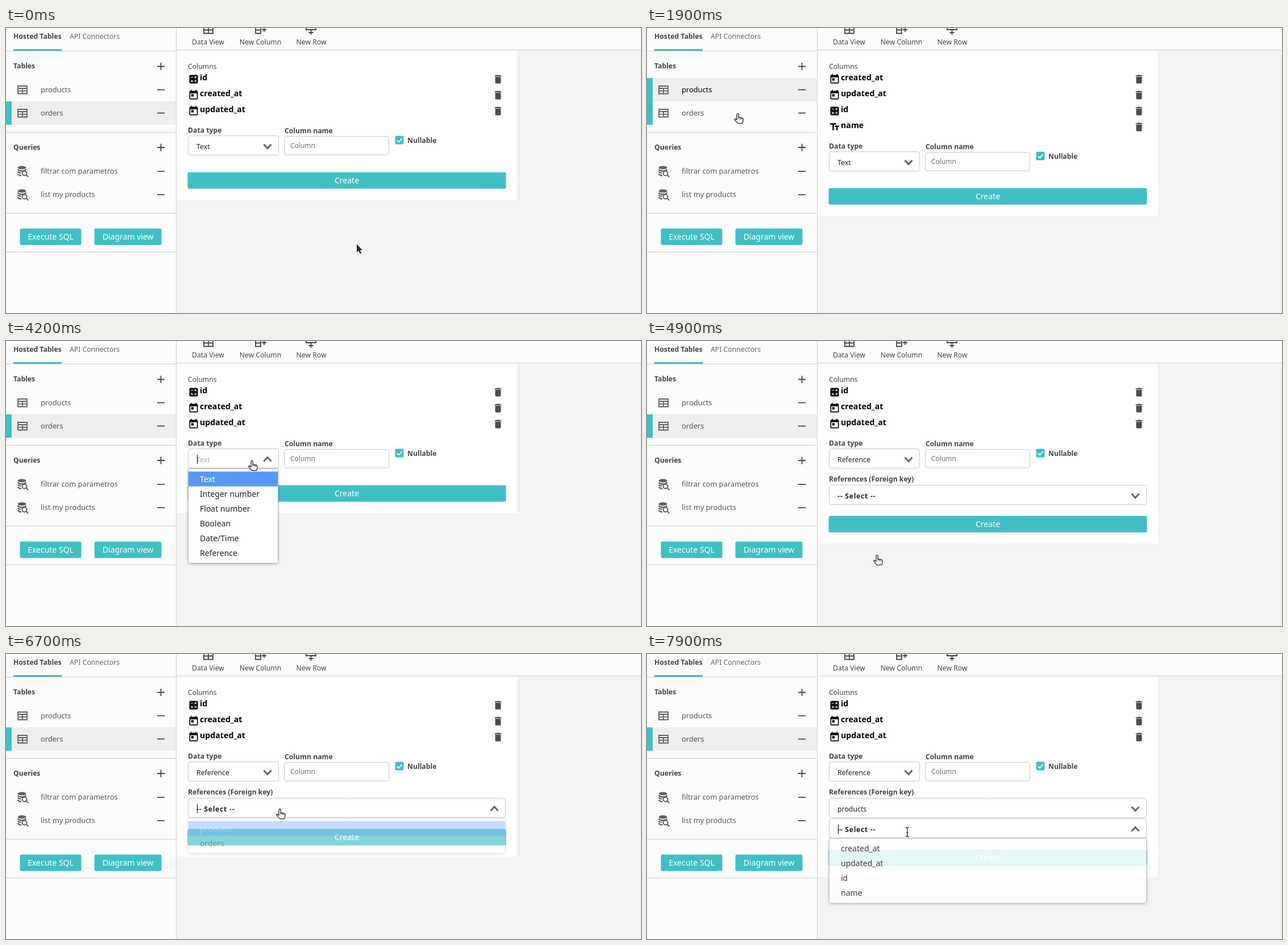
An HTML page with a canvas that plays this animation: 1117 by 501 pixels, repeating every 8 s.

```html
<!DOCTYPE html>
<html lang="en">
<head>
<meta charset="utf-8">
<title>Table editor</title>
<style>
html, body { margin: 0; width: 100%; height: 100%; overflow: hidden; background: #f3f3f3; }
canvas { display: block; }
</style>
</head>
<body>
<canvas id="stage" width="1117" height="501"></canvas>
<script>
const ctx = document.getElementById('stage').getContext('2d');
const TEAL = '#40bfc5', LINE = '#cfcfcf', GREY = '#616161', DARK = '#444';
const LOOP = 8000, STEP = 100;

// Cursor stops: time, hot spot x and y, shape from then on
const stops = [
  [0, 617, 380, 'arrow'], [200, 617, 380, 'arrow'], [400, 444, 256, 'hand'], [500, 444, 256, 'arrow'],
  [800, 169, 113, 'hand'], [900, 169, 113, 'hand'], [1000, 179, 120, 'hand'], [1100, 179, 120, 'hand'],
  [1400, 172, 118, 'hand'], [1500, 172, 118, 'hand'], [1900, 160, 150, 'hand'], [2600, 160, 150, 'hand'],
  [2700, 179, 154, 'hand'], [2800, 235, 164, 'hand'], [2900, 300, 177, 'arrow'], [3200, 402, 200, 'arrow'],
  [3300, 402, 200, 'arrow'], [3400, 425, 203, 'arrow'], [3700, 425, 203, 'hand'], [3900, 433, 210, 'hand'],
  [4200, 433, 210, 'hand'], [4600, 405, 376, 'hand'], [5100, 405, 376, 'arrow'], [5600, 515, 215, 'beam'],
  [5800, 522, 208, 'beam'], [6300, 522, 208, 'beam'], [6400, 518, 220, 'arrow'], [6700, 482, 272, 'hand'],
  [7100, 476, 292, 'hand'], [7200, 473, 303, 'hand'], [7300, 473, 303, 'hand'], [7600, 458, 313, 'hand'],
  [7800, 458, 313, 'beam'], [LOOP, 458, 313, 'beam']
];
const pointers = {
  arrow: new Path2D('M0 0V14.5l3.3-3 2.5 5.5 2.4-1-2.5-5.4H10z'),
  hand: new Path2D('M-2 11V2a1.6 1.6 0 0 1 3.2 0V7l6 1.2q2 .5 2 2.5l-.5 4-1.2 3H-.6l-5.2-6.3q-.8-1.8 1-1.9 1 .2 2.8 2z'),
  beam: new Path2D('M-3-8q3 0 3 2V6q0 2-3 2M3-8Q0-8 0-6M0 6q0 2 3 2M-1.5 1h3')
};

function rect(x, y, w, h, fill, radius = 0, border) {
  ctx.beginPath();
  ctx.roundRect(x, y, w, h, radius);
  if (fill) { ctx.fillStyle = fill; ctx.fill(); }
  if (border) { ctx.strokeStyle = border; ctx.lineWidth = 1; ctx.stroke(); }
}
function text(str, x, y, size, weight = 400, color = DARK, align = 'left') {
  ctx.font = `${weight} ${size}px "Noto Sans", sans-serif`;
  ctx.textAlign = align;
  ctx.fillStyle = color;
  ctx.fillText(str, x, y);
}
function stroke(path, x, y, color = GREY, width = 2) {
  ctx.save();
  ctx.translate(x, y);
  ctx.strokeStyle = color;
  ctx.lineWidth = width;
  ctx.stroke(new Path2D(path));
  ctx.restore();
}
// Icon drawn on a 24 unit grid, shown 20 pixels wide
function icon(path, x, y, color) {
  ctx.save();
  ctx.translate(x, y);
  ctx.scale(20 / 24, 20 / 24);
  ctx.fillStyle = color;
  ctx.fill(new Path2D(path), 'evenodd');
  ctx.restore();
}
function button(label, x, y, w, color = TEAL) {
  rect(x - .5, y - .5, w + 1, 29, color, 3);
  text(label, x + w / 2, y + 19, 14, 500, '#fff', 'center');
}

const tableIcon = (x, y) => stroke('M1 1H17V14.5H1zM1 5H17M1 9.7H17M9 5V14.5', x, y, GREY, 1.8);
const plus = y => stroke('M0 6.5H13M6.5 0V13', 266, y - 6.5, DARK, 1.8);
const minus = y => stroke('M0 0H13', 266, y, DARK, 1.8);
const trash = y => icon('M6 19q0 2 2 2h8q2 0 2-2V7H6zM19 4h-3.5l-1-1h-5l-1 1H5v2h14z', 855.5, y, '#4c4c4c');

function queryIcon(y) {
  ctx.fillStyle = GREY;
  ctx.beginPath(); ctx.ellipse(28, y - 6, 7.5, 3, 0, 0, 7); ctx.fill();
  stroke('M-7.5 -3Q-5 0 0 0T7.5-3M-7.5 1Q-5 3.5-2 3.5M-7.5 5Q-5 8-1 8', 28, y, GREY, 2.4);
  ctx.beginPath(); ctx.arc(32.5, y + 4, 4, 0, 7);
  ctx.fillStyle = '#fcfcfc'; ctx.fill();
  ctx.strokeStyle = GREY; ctx.lineWidth = 2; ctx.stroke();
  stroke('M0 0L4 4', 35.2, y + 6.5);
}
function columnIcon(name, y) {
  if (name === 'id') {
    rect(322.5, y + 2.5, 15, 15, '#000', 2);
    stroke('M-5-3.5H-1M1.5 2.2H5.2M1.5 4.4H5.2M-5 3.3H-1M-3 1.3V5.3M1.6-5.2L5-1.8M5-5.2L1.6-1.8', 330, y + 10, '#fff', 1.2);
  } else if (name === 'name') {
    icon('M2.5 4v3h5v12h3V7h5V4zM21.5 9h-9v3h3v7h3v-7h3z', 320, y, '#000');
  } else {
    icon('M19 3h-1V1h-2v2H8V1H6v2H5q-2 0-2 2V19q0 2 2 2h14q2 0 2-2V5q0-2-2-2zM5 8h14v11H5zM7 10h5v5H7z', 320, y, '#000');
  }
}

function select(x, y, w, value, { open = false, dim = false, prompt = false } = {}) {
  rect(x + .5, y + .5, w - 1, 34, '#fff', 4, '#c8c8c8');
  ctx.letterSpacing = prompt ? '.7px' : '0px';
  text(value, x + 15, y + 24, 12.3, prompt ? 600 : 500, dim && open ? '#aaa' : '#222');
  ctx.letterSpacing = '0px';
  if (open) rect(x + 16, y + 11, 1, 16, '#000');
  stroke(open ? 'M-6.5 3.5L0-3.5L6.5 3.5' : 'M-6.5-3.5L0 3.5L6.5-3.5', x + w - 20, y + 19, '#666', 3);
}
function dropdown(x, y, w, options, alpha, active) {
  if (!alpha) return;
  const h = options.length * 26 + 10, corners = [0, 0, 4, 4];
  ctx.save();
  ctx.globalAlpha = alpha;
  // Keep the shadow outside the box, so that it does not show through
  ctx.save();
  ctx.beginPath();
  ctx.rect(0, 0, 1117, 501);
  ctx.rect(x, y, w + 1, h + .5);
  ctx.clip('evenodd');
  ctx.shadowColor = '#0005';
  ctx.shadowBlur = 5;
  ctx.shadowOffsetY = 1;
  rect(x + .5, y, w, h, '#fff', corners);
  ctx.restore();
  rect(x + .5, y, w, h, '#fff', corners, '#bbb');
  options.forEach((name, i) => {
    const top = y + 5 + i * 26;
    if (i === active) rect(x + 1, top, w - 1, 26, '#5897f5');
    text(name, x + 21, top + 18, 14, 500, i === active ? '#fff' : '#222');
  });
  ctx.restore();
}
function fade(t, open, close) {
  if (t < open || t >= close + STEP) return 0;
  if (t >= close) return .4;
  return t < open + STEP ? .35 : t < open + 2 * STEP ? .87 : 1;
}

function pointerAt(t) {
  const i = stops.findIndex(s => s[0] > t) - 1;
  const [t0, x0, y0, shape] = stops[i], [t1, x1, y1] = stops[i + 1];
  const k = (t - t0) / (t1 - t0);
  return { x: x0 + (x1 - x0) * k, y: y0 + (y1 - y0) * k, shape };
}
function drawPointer({ x, y, shape }) {
  const path = pointers[shape];
  ctx.save();
  ctx.translate(x, y);
  ctx.lineJoin = 'round';
  ctx.strokeStyle = '#fff';
  ctx.lineWidth = shape === 'hand' ? 3 : 2.5;
  ctx.stroke(path);
  if (shape !== 'beam') { ctx.fillStyle = shape === 'hand' ? '#fff' : '#222'; ctx.fill(path); }
  if (shape !== 'arrow') { ctx.strokeStyle = '#222'; ctx.lineWidth = 1.3; ctx.stroke(path); }
  if (shape === 'hand') stroke('M1.2 7V10M3.9 8V11M6.5 8.5V11', 0, 0, '#222', 1);
  ctx.restore();
}

function sidebar(t, pointer) {
  rect(0, 0, 299, 501, '#fcfcfc');
  text('Hosted Tables', 13, 19, 12.2, 600);
  text('API Connectors', 112, 19, 12.2, 500, '#666');
  for (const y of [40, 183, 325, 393]) rect(0, y, 299, 1, LINE);
  rect(13, 37, 85, 3, TEAL);
  text('Tables', 13, 71, 12.2, 600);
  text('Queries', 13, 214, 12.2, 600);
  plus(67.5);
  plus(210);

  const selected = t >= 1200 && t < 2200 ? 0 : 1;
  const focused = t >= 1200 && t < 3800;
  ['products', 'orders'].forEach((name, i) => {
    const top = 88 + i * 41;
    const hover = pointer.x < 299 && pointer.y >= top && pointer.y < top + 41;
    if (i === selected) rect(0, top, 299, 41, '#eee');
    if (i === selected || hover) rect(0, top, 10, 41, TEAL);
    tableIcon(20, top + 13);
    text(name, 61, top + 25, 12.8, 500, i === selected && focused ? '#000' : '#555');
    minus(top + 20.5);
  });
  ['filtrar com parametros', 'list my products'].forEach((name, i) => {
    const y = 251.5 + i * 41;
    queryIcon(y);
    text(name, 61, y + 4.5, 12.8, 500, '#555');
    minus(y + .5);
  });
  button('Execute SQL', 25, 353, 107);
  button('Diagram view', 156, 353, 117);
  rect(299, 0, 1, 501, LINE);
}

function toolbar() {
  rect(300, 0, 817, 38, '#fcfcfc');
  rect(300, 38, 817, 1, LINE);
  stroke('M1-4V9.5H17V-4M1 3.5H17M9-4V9.5', 347, 0, DARK, 1.8);
  stroke('M1-4V9.5H10V-4M1 3.5H10M12 3H20M16-1V7', 438, 0, DARK, 1.8);
  stroke('M1-4V3H18V-4M9.5 4V12M5.5 8H13.5', 527, 0, DARK, 1.8);
  text('Data View', 355.5, 29, 12.2, 500, DARK, 'center');
  text('New Column', 447.5, 29, 12.2, 500, DARK, 'center');
  text('New Row', 537, 29, 12.2, 500, DARK, 'center');
}

const productColumns = ['created_at', 'updated_at', 'id', 'name'];
const orderColumns = ['id', 'created_at', 'updated_at'];
const dataTypes = ['Text', 'Integer number', 'Float number', 'Boolean', 'Date/Time', 'Reference'];

function panel(t, pointer) {
  const columns = t >= 1300 && t < 2300 ? productColumns : orderColumns;
  const shift = (columns.length - 3) * 28;
  const reference = t >= 4700, second = t >= 7500;
  const createY = second ? 344 : reference ? 308 : 254 + shift;

  rect(300, 39, 599, createY + 9, '#fff');
  text('Columns', 320, 72, 12.2, 500);
  columns.forEach((name, i) => {
    const y = 80 + i * 28;
    columnIcon(name, y);
    text(name, 341, y + 12, 14.2, 600, '#000');
    trash(y);
  });

  text('Data type', 320, 184 + shift, 12.2, 600);
  select(320, 189 + shift, 160, reference ? 'Reference' : 'Text', { open: t >= 3800 && t < 4700, dim: true });

  const typing = t >= 5700 && t < 6700;
  text('Column name', 490, 185 + shift, 12.2, 600);
  rect(489.5, 190.5 + shift, 184, 32.5, '#fff', 4, typing ? '#777' : '#c8c8c8');
  text('Column', 500, 211 + shift, 12, 500, '#707070');
  if (typing) {
    let wave = 'M0 1';
    for (let x = 2; x <= 44; x += 2) wave += `L${x} ${x % 4 ? -.5 : 1}`;
    stroke(wave, 500, 213, '#e33', 1);
  }

  rect(684.5, 189.5 + shift, 15, 15, TEAL, 2);
  stroke('M3 7.5L6 10.5L11.5 4', 685, 190 + shift, '#fff', 1.8);
  text('Nullable', 706, 202 + shift, 12.2, 600);

  if (reference) {
    const chosen = t >= 7400;
    text('References (Foreign key)', 320, 247, 12.2, 600);
    select(320, 253, 559, chosen ? 'products' : '-- Select --', { open: t >= 6700 && !chosen, prompt: !chosen });
  }
  if (second) select(320, 289, 559, '-- Select --', { open: t >= 7800, prompt: true });
  button('Create', 320, createY, 559, t >= 400 && t < 600 ? '#3ab5bb' : TEAL);

  const hovered = Math.max(0, Math.min(5, Math.floor((pointer.y - 230) / 26)));
  dropdown(320, 224.5, 158, dataTypes, fade(t, 3800, 4700), hovered);
  dropdown(320, 288.5, 558, ['products', 'orders'], fade(t, 6700, 7400), 0);
  dropdown(320, 324, 558, productColumns, fade(t, 7800, LOOP), -1);
}

function draw(now) {
  const t = Math.floor(now % LOOP / STEP) * STEP;
  const pointer = pointerAt(t);
  rect(0, 0, 1117, 501, '#f3f3f3');
  sidebar(t, pointer);
  toolbar();
  panel(t, pointer);
  drawPointer(pointer);
}
const start = performance.now();
function tick() {
  draw(performance.now() - start);
  requestAnimationFrame(tick);
}
tick();
</script>
</body>
</html>
```
